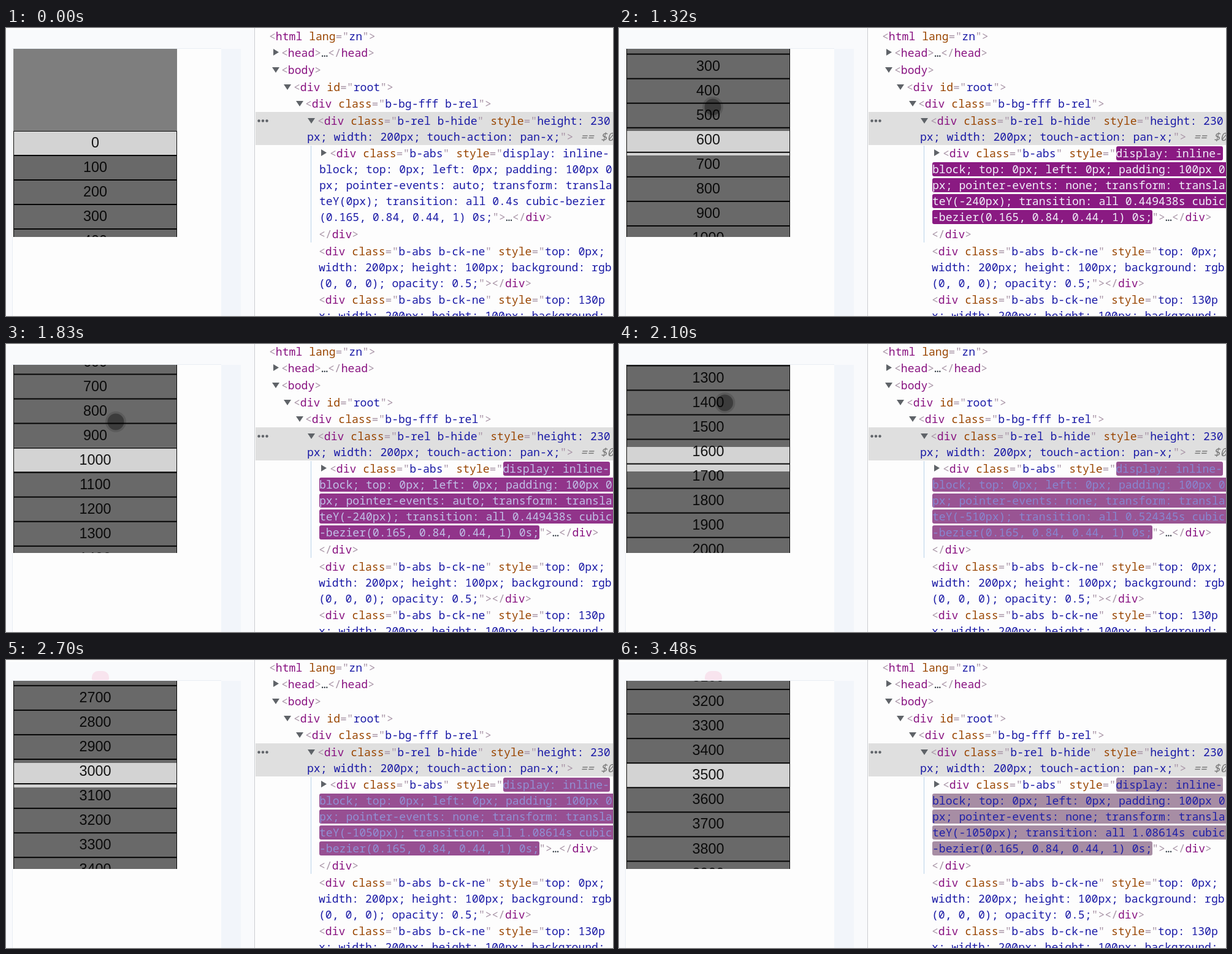
These frames come from a looping animation (990 px wide and 470 px high, 3510 ms). An HTML page with a canvas:

```html
<!DOCTYPE html>
<html lang="en">
<head>
<meta charset="utf-8">
<style>
  html, body { margin: 0; width: 100%; height: 100%; overflow: hidden; background: #fdfdfd; }
  canvas { display: block; }
</style>
</head>
<body>
<canvas id="stage" width="990" height="470"></canvas>
<script>
const ctx = document.getElementById('stage').getContext('2d');
const LOOP = 3510, STEP = 30, ZOOM = 1.335, ROW = 30 * ZOOM;
const BOX = { x: 12, y: 34, w: 267, h: 307 };
const MONO = '18.1px "Noto Sans Mono", "DejaVu Sans Mono", monospace';
const COLOR = { punct: '#a894a6', tag: '#881280', attr: '#994500', value: '#1a1aa6', text: '#303942' };

// Pointer path: time, x, y
const PATH = [
  [750, 60, 30], [930, 98, 134], [1090, 140, 308], [1250, 150, 148], [1320, 153, 129],
  [1420, 158, 50], [1715, 172, 205], [1830, 179, 127], [1866, 180, 90], [2060, 174, 75],
  [2400, 162, 254], [2405, 162, 256], [2487, 155, 36], [2520, 154, 22]
];
const SWIPES = [
  { press: 1090, release: 1250, from: 0, to: 240, duration: '0.449438' },
  { press: 1715, release: 1866, from: 240, to: 510, duration: '0.524345' },
  { press: 2405, release: 2487, from: 510, to: 1050, duration: '1.08614' }
];

const mix = (a, b, u) => a * (1 - u) + b * u;
const mixColor = (a, b, u) => `rgb(${a.map((v, i) => Math.round(mix(v, b[i], u)))})`;

function rect(color, x, y, w, h) {
  ctx.fillStyle = color;
  ctx.fillRect(x, y, w, h);
}

function disc(color, x, y, r) {
  ctx.fillStyle = color;
  ctx.beginPath();
  ctx.arc(x, y, r, 0, 7);
  ctx.fill();
}

function pointerAt(t) {
  const i = PATH.findIndex(p => p[0] > t);
  if (i < 1) return null;
  const [a, b] = [PATH[i - 1], PATH[i]], u = (t - a[0]) / (b[0] - a[0]);
  return { x: mix(a[1], b[1], u), y: mix(a[2], b[2], u) };
}

// cubic-bezier(0.165, 0.84, 0.44, 1)
function ease(x) {
  if (x >= 1) return 1;
  const curve = (s, a, b) => 3 * (1 - s) ** 2 * s * a + 3 * (1 - s) * s * s * b + s ** 3;
  let low = 0, high = 1;
  for (let i = 0; i < 24; i++) {
    const mid = (low + high) / 2;
    if (curve(mid, 0.165, 0.44) < x) low = mid; else high = mid;
  }
  return curve(low, 0.84, 1);
}

function scrollAt(t) {
  const swipe = SWIPES.filter(s => t >= s.press).pop();
  if (!swipe) return 0;
  const { press, release, from, to, duration } = swipe;
  const dragged = time => from + (pointerAt(press).y - pointerAt(time).y) / ZOOM;
  if (t < release) return dragged(t);
  return mix(dragged(release), to, ease((t - release) / (duration * 1000)));
}

function drawPicker(t) {
  const { x, y, w, h } = BOX, top = 100 * ZOOM, offset = scrollAt(t), scroll = offset * ZOOM;
  // Rows sit on whole pixels only while the list rests
  const resting = Math.abs(offset - Math.round(offset / 30) * 30) < 0.2;
  const rowTop = i => {
    const position = y + top + i * ROW - scroll;
    return resting ? Math.round(position) : position;
  };
  ctx.save();
  ctx.beginPath();
  ctx.rect(x, y, w, h);
  ctx.clip();
  ctx.font = '23.4px Arial, "Liberation Sans", sans-serif';
  ctx.textAlign = 'center';
  const first = Math.max(0, Math.floor((scroll - top) / ROW));
  rect('#d3d3d3', x, rowTop(first), w, h + ROW);
  for (let i = first; i < first + 10; i++) {
    const edge = rowTop(i);
    rect('#0a0a0a', x, edge - (i ? 1 : 0), w, i ? 2 : 1);
    rect('#0a0a0a', x, edge, 1, ROW);
    rect('#0a0a0a', x + w - 1, edge, 1, ROW);
    ctx.fillStyle = '#151515';
    ctx.fillText(i * 100, 145.5, edge + 27.2);
  }
  rect('rgba(0,0,0,.5)', x, y, w, 134);
  rect('rgba(0,0,0,.5)', x, y + 174, w, 133);
  ctx.restore();
}

function styleState(t) {
  const swipe = SWIPES.filter(s => t >= s.release).pop();
  if (!swipe) return { y: '0', events: 'auto', tail: ['0.4s cubic-bezier', ''], flash: null };
  const end = swipe.release + swipe.duration * 1000, done = t >= end;
  const age = t - (done ? end : swipe.release);
  return {
    y: -swipe.to,
    events: done ? 'auto' : 'none',
    tail: [swipe.duration + 's cubic', '-bezier'],
    flash: 1 - Math.exp(-Math.max(0, age - 55) / 240)
  };
}

// Each line: x, vertical centre, text
const sourceLines = s => [
  [429, 14, '<html lang="zn">'],
  [449, 41, '<head>…</head>'],
  [449, 69, '<body>'],
  [469, 97, '<div id="root">'],
  [488, 124, '<div class="b-bg-fff b-rel">'],
  [508, 152, '<div class="b-rel b-hide" style="height: 230'],
  [491, 178, 'px; width: 200px; touch-action: pan-x;">'],
  [528, 205, '<div class="b-abs" style="display: inline-'],
  [511, 231, 'block; top: 0px; left: 0px; padding: 100px 0'],
  [511, 257, `px; pointer-events: ${s.events}; transform: transla`],
  [511, 283, `teY(${s.y}px); transition: all ${s.tail[0]}`],
  [511, 309, s.tail[1] + '(0.165, 0.84, 0.44, 1) 0s;">…</div>'],
  [510, 337, '</div>'],
  [510, 365, '<div class="b-abs b-ck-ne" style="top: 0px;'],
  [510, 391, 'width: 200px; height: 100px; background: rgb'],
  [510, 417, '(0, 0, 0); opacity: 0.5;"></div>'],
  [510, 444, '<div class="b-abs b-ck-ne" style="top: 130p'],
  [510, 470, 'x; width: 200px; height: 100px; background:']
];

function drawArrow(x, y, open) {
  ctx.fillStyle = '#5f6368';
  ctx.beginPath();
  if (open) { ctx.moveTo(x - 6, y - 5); ctx.lineTo(x + 6, y - 5); ctx.lineTo(x, y + 4); }
  else { ctx.moveTo(x - 4, y - 7); ctx.lineTo(x + 5, y - 1.5); ctx.lineTo(x - 4, y + 4); }
  ctx.fill();
}

function drawInspector(t) {
  const state = styleState(t), lit = state.flash !== null;
  ctx.save();
  ctx.beginPath();
  ctx.rect(407, 0, 583, 470);
  ctx.clip();
  if (t >= 1700) ctx.translate(0, -1);

  rect('#dfdfdf', 407, 137, 583, 54);
  rect('#b9d3ea', 497, 192, 1, 158);
  for (let i = 0; i < 3; i++) disc('#5f6368', 412.5 + i * 6.5, 151.5, 2.2);
  drawArrow(440, 41, false);
  [[440, 69], [459, 97], [479, 124], [498, 152]].forEach(([x, y]) => drawArrow(x, y, true));
  drawArrow(518, 205, false);

  if (lit) {
    ctx.fillStyle = mixColor([136, 18, 128], [168, 144, 165], state.flash);
    [[811, 985], [511, 992], [511, 992], [511, 992], [511, 870]].forEach(([a, b], i) => {
      ctx.beginPath();
      ctx.roundRect(a, 193 + i * 26, b - a, 23, 3);
      ctx.fill();
    });
  }
  const flashText = lit ? mixColor([255, 255, 255], [26, 26, 166], state.flash) : COLOR.value;

  ctx.font = MONO;
  ctx.textAlign = 'left';
  let quoted = false;
  sourceLines(state).forEach(([x, y, line], row) => {
    let previous = '';
    for (const token of line.match(/<\/?|[">=…]|\s+|[^\s"<>=…]+/g)) {
      let color = COLOR.attr;
      if (token === '"') { quoted = !quoted; color = COLOR.punct; }
      else if (quoted) color = row > 6 && row < 12 && (row > 7 || x > 800) ? flashText : COLOR.value;
      else if (/[<>=]/.test(token)) color = COLOR.punct;
      else if (token === '…') color = COLOR.text;
      else if (previous[0] === '<') color = COLOR.tag;
      ctx.fillStyle = color;
      ctx.fillText(token, x, y + 6);
      x += ctx.measureText(token).width;
      previous = token;
    }
  });
  ctx.font = 'italic ' + MONO;
  ctx.fillStyle = '#777';
  ctx.fillText('== $0', 937, 184);
  ctx.restore();
}

function drawPage(t) {
  rect('#fdfdfd', 0, 0, 990, 470);
  rect('#f9fafc', 0, 3, 405, 467);
  rect('#f2f5fa', 351, 34, 32, 436);
  rect('#e9edf3', 10, 33, 341, 437);
  rect('#fdfdfd', 11, 34, 340, 436);
  rect('#cbcdd1', 405, 0, 1, 470);
  if (t >= 2520) {
    ctx.fillStyle = '#f8e4ee';
    ctx.beginPath();
    ctx.roundRect(140, 18, 28, 15, [10, 10, 2, 2]);
    ctx.fill();
  }
}

function frame(now) {
  const t = Math.floor((now % LOOP) / STEP) * STEP;
  drawPage(t);
  drawPicker(t);
  const pointer = pointerAt(t);
  if (pointer) {
    disc('rgba(0,0,0,.13)', pointer.x, pointer.y, 17);
    disc('rgba(0,0,0,.34)', pointer.x, pointer.y, 13.5);
  }
  drawInspector(t);
  requestAnimationFrame(frame);
}
requestAnimationFrame(frame);
</script>
</body>
</html>
```
